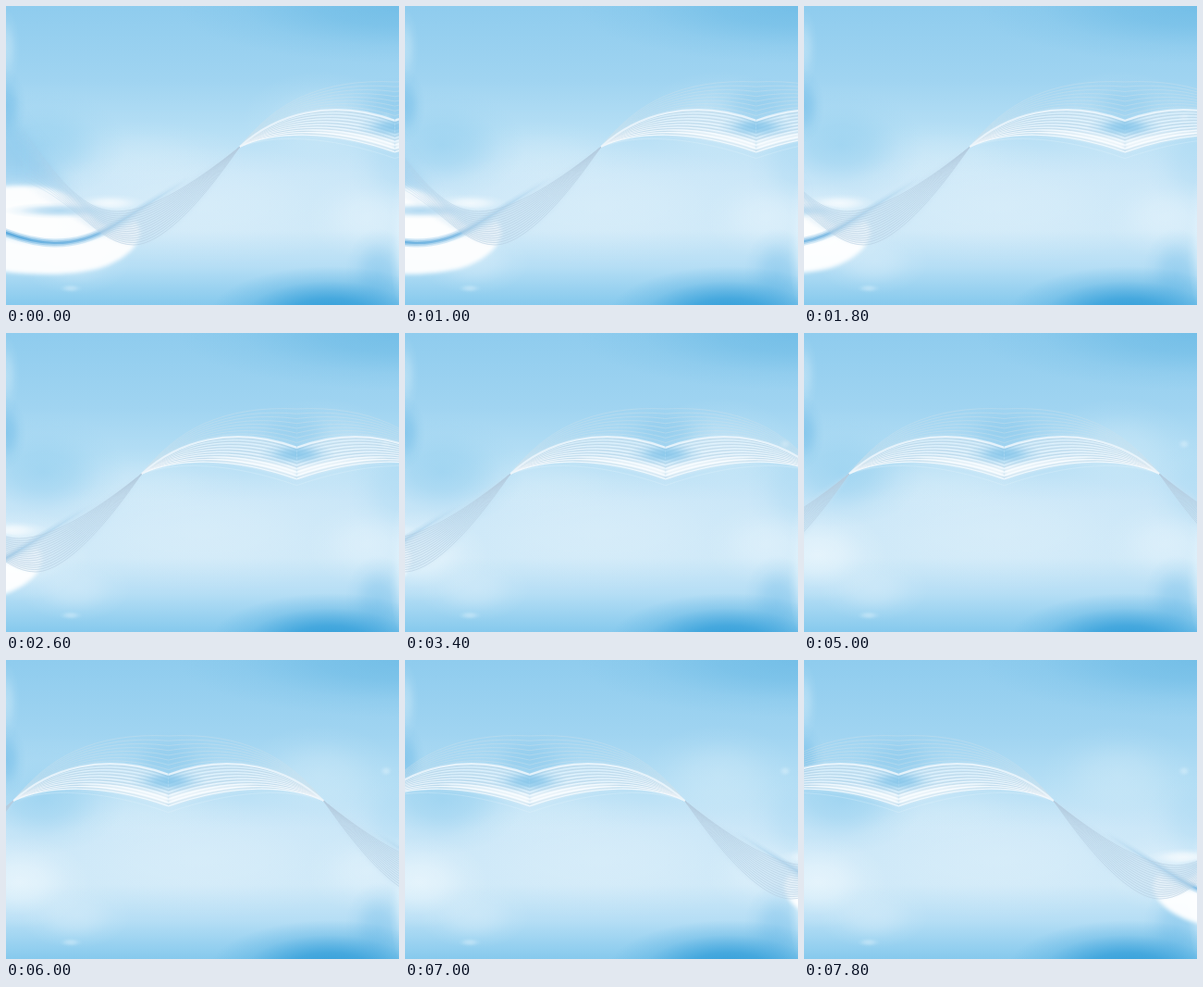
Recreate the animation shown at these times as an HTML page. Size 425 px wide and 323 px high, loop 8 s.

```html
<!DOCTYPE html>
<html lang="en">
<head>
<meta charset="utf-8">
<title>Blue wave</title>
<style>
html, body { margin: 0; width: 100%; height: 100%; overflow: hidden; background: #a6d7f2; }
svg { display: block; width: 100vw; height: 100vh; }
</style>
</head>
<body>
<svg viewBox="0 0 425 323" preserveAspectRatio="none">
  <defs>
    <linearGradient id="sky" x2="0" y2="1">
      <stop offset="0" stop-color="#8fccee"/>
      <stop offset=".25" stop-color="#a0d4f1"/>
      <stop offset=".42" stop-color="#b6dff5"/>
      <stop offset=".56" stop-color="#cbe7f8"/>
      <stop offset=".75" stop-color="#cfe9f8"/>
      <stop offset=".87" stop-color="#b6def5"/>
      <stop offset=".95" stop-color="#98d1f0"/>
      <stop offset="1" stop-color="#86c9ed"/>
    </linearGradient>
    <linearGradient id="mesh" gradientUnits="userSpaceOnUse" x1="0" y1="0" x2="110" y2="0">
      <stop offset="0" stop-color="#a3c4de" stop-opacity="0"/>
      <stop offset=".4" stop-color="#a3c4de" stop-opacity=".5"/>
      <stop offset="1" stop-color="#a9bfd3"/>
    </linearGradient>
    <linearGradient id="veil" gradientUnits="userSpaceOnUse" x1="10" y1="0" x2="110" y2="0">
      <stop offset="0" stop-color="#b4d7ef" stop-opacity="0"/>
      <stop offset="1" stop-color="#c6e1f3"/>
    </linearGradient>
    <linearGradient id="rim" gradientUnits="userSpaceOnUse" x1="0" y1="0" x2="200" y2="0">
      <stop offset="0" stop-color="#4fa3da"/>
      <stop offset=".5" stop-color="#7db9e2"/>
      <stop offset="1" stop-color="#b4d6ec" stop-opacity="0"/>
    </linearGradient>
    <filter id="soft" x="-30%" y="-30%" width="160%" height="160%"><feGaussianBlur stdDeviation="2"/></filter>
    <filter id="softer" x="-40%" y="-40%" width="180%" height="180%"><feGaussianBlur stdDeviation="8"/></filter>
    <clipPath id="side"><path d="M-40 0H420.5V323H-40Z"/></clipPath>
    <g id="half" clip-path="url(#side)"></g>
  </defs>
  <g id="back"><path fill="url(#sky)" d="M0 0H425V323H0Z"/></g>
  <use id="left" href="#half"/>
  <use id="right" href="#half"/>
</svg>
<script>
const NS = 'http://www.w3.org/2000/svg';
const $ = id => document.getElementById(id);
const SEAM = 420.5, STEP = 200, SHIFT = 8.16, STEPS = 40;

function add(parent, tag, attrs) {
  const el = document.createElementNS(NS, tag);
  for (const key in attrs) el.setAttribute(key, attrs[key]);
  return parent.appendChild(el);
}

function glow(parent, cx, cy, rx, ry, color, alpha) {
  const id = 'g' + color.slice(1);
  if (!$(id)) {
    const grad = add(document.querySelector('defs'), 'radialGradient', { id });
    [[0, 1], [.35, .75], [.7, .22], [1, 0]].forEach(([offset, a]) =>
      add(grad, 'stop', { offset, 'stop-color': color, 'stop-opacity': a }));
  }
  add(parent, 'ellipse', { cx, cy, rx, ry, fill: `url(#${id})`, opacity: alpha });
}

function line(d, stroke, width, opacity = 1) {
  add($('half'), 'path', { d, fill: 'none', stroke, 'stroke-width': width, opacity });
}

function shape(d, fill, opacity, filter) {
  add($('half'), 'path', { d, fill, opacity, filter: `url(#${filter})` });
}

// Curve between two curves given as flat coordinate lists
function blend(a, b, k) {
  const p = a.map((v, i) => (v + (b[i] - v) * k).toFixed(2));
  return `M${p[0]} ${p[1]}C${p.slice(2).join(' ')}`;
}

function drawBack() {
  const g = $('back');
  glow(g, 425, 0, 240, 62, '#62b6e3', .6);
  glow(g, 150, 165, 110, 40, '#d8eef9', .4);
  glow(g, 40, 150, 90, 60, '#93cfef', .65);
  glow(g, 0, 45, 15, 42, '#dff2fb', .4);
  glow(g, 0, 108, 22, 40, '#6cb9e6', .55);
  glow(g, 340, 125, 85, 55, '#d8eef9', .4);
  glow(g, 425, 172, 55, 55, '#93cfef', .3);
  glow(g, 210, 215, 190, 65, '#def0fa', .5);
  glow(g, 15, 240, 75, 50, '#f2fafe', .6);
  glow(g, 75, 276, 60, 36, '#def0fa', .45);
  glow(g, 390, 228, 65, 45, '#eaf6fd', .45);
  glow(g, 70, 305, 13, 5, '#e8f6fd', .4);
  glow(g, 402, 290, 36, 50, '#6dbae7', .4);
  glow(g, 350, 335, 130, 54, '#2497d6', .9);
  glow(g, 430, 255, 16, 75, '#e8f6fd', .6);
  glow(g, 411, 120, 7, 6, '#e8f6fd', .4);
}

function drawHalf() {
  const g = $('half');
  // Shade and white pools at the far end
  shape('M-30 105L0 112C22 140 45 175 72 203C50 192 20 190 -30 194Z', '#84c4ea', .5, 'softer');
  glow(g, 112, 213, 40, 10, '#ffffff', .7);
  shape('M-30 199C15 190 58 193 78 212C92 228 102 236 112 239C75 258 30 258 -30 236Z', '#ffffff', .95, 'soft');
  glow(g, 58, 221, 62, 9, '#a6d3ef', .85);
  shape('M-30 243C40 266 85 262 140 232C156 250 132 274 102 283C62 293 20 291 -30 283Z', '#ffffff', .95, 'soft');
  const rim = 'M-30 232C35 264 75 262 115 238S190 190 253 152';
  [[9, .25], [5.5, .4], [2.2, .8]].forEach(([width, alpha]) => line(rim, 'url(#rim)', width, alpha));

  // Ribbon mesh beyond the crossing
  shape('M0 110C35 165 80 224 120 223C160 221 200 185 253 152C238 178 182 258 138 257C105 256 70 222 10 190Z',
    'url(#veil)', .4, 'soft');
  const upper = [253, 152, 210, 186, 160, 222, 120, 222, 85, 222, 55, 190, 0, 105];
  const lower = [253, 152, 240, 170, 180, 258, 138, 258, 100, 258, 75, 210, 20, 189];
  for (let i = 0; i <= 15; i++) {
    const d = blend(upper, lower, i / 15);
    line(d, 'url(#veil)', 1, .3);
    line(d, 'url(#mesh)', .5, .75);
  }

  // Fan between the crossing and the seam
  const top = [253, 152, 290, 105, 340, 78, 421, 82];
  const mid = [253, 152, 290, 118, 350, 98, 421, 124];
  const low = [253, 152, 290, 135, 350, 133, 421, 158];
  glow(g, 421, 108, 55, 32, '#84c5ea', .55);
  shape('M253 152C290 118 350 98 421 124V158C350 133 290 135 253 152Z', '#e4f2fb', .5, 'soft');
  for (let i = 0; i < 8; i++) {
    line(blend(top, mid, i / 8), '#cfdfea', .7, .6);
  }
  for (let i = 1; i <= 9; i++) {
    const k = i / 9;
    line(blend(mid, low, k - .05), '#a3b9ca', .5, .6);
    line(blend(mid, low, k), '#fafdff', .7 + .5 * k, .5 + .35 * k);
  }
  glow(g, 421, 131, 42, 13, '#84c5ea', .9);
  shape('M320 137C350 132 390 138 421 147V156C380 143 350 138 320 137Z', '#ffffff', .7, 'soft');
  line(blend(mid, low, 1.2), '#e6f3fb', .7, .4);
  line(blend(mid, low, 0), '#ecf6fc', 2.2, .9);
}

function render(now) {
  const seam = SEAM - SHIFT * (Math.floor(now / STEP) % STEPS);
  $('left').setAttribute('transform', `translate(${seam - SEAM} 0)`);
  $('right').setAttribute('transform', `translate(${seam + SEAM} 0) scale(-1 1)`);
}

drawBack();
drawHalf();
render(0);

let start;
requestAnimationFrame(function tick(now) {
  start ??= now;
  render(now - start);
  requestAnimationFrame(tick);
});
</script>
</body>
</html>
```
